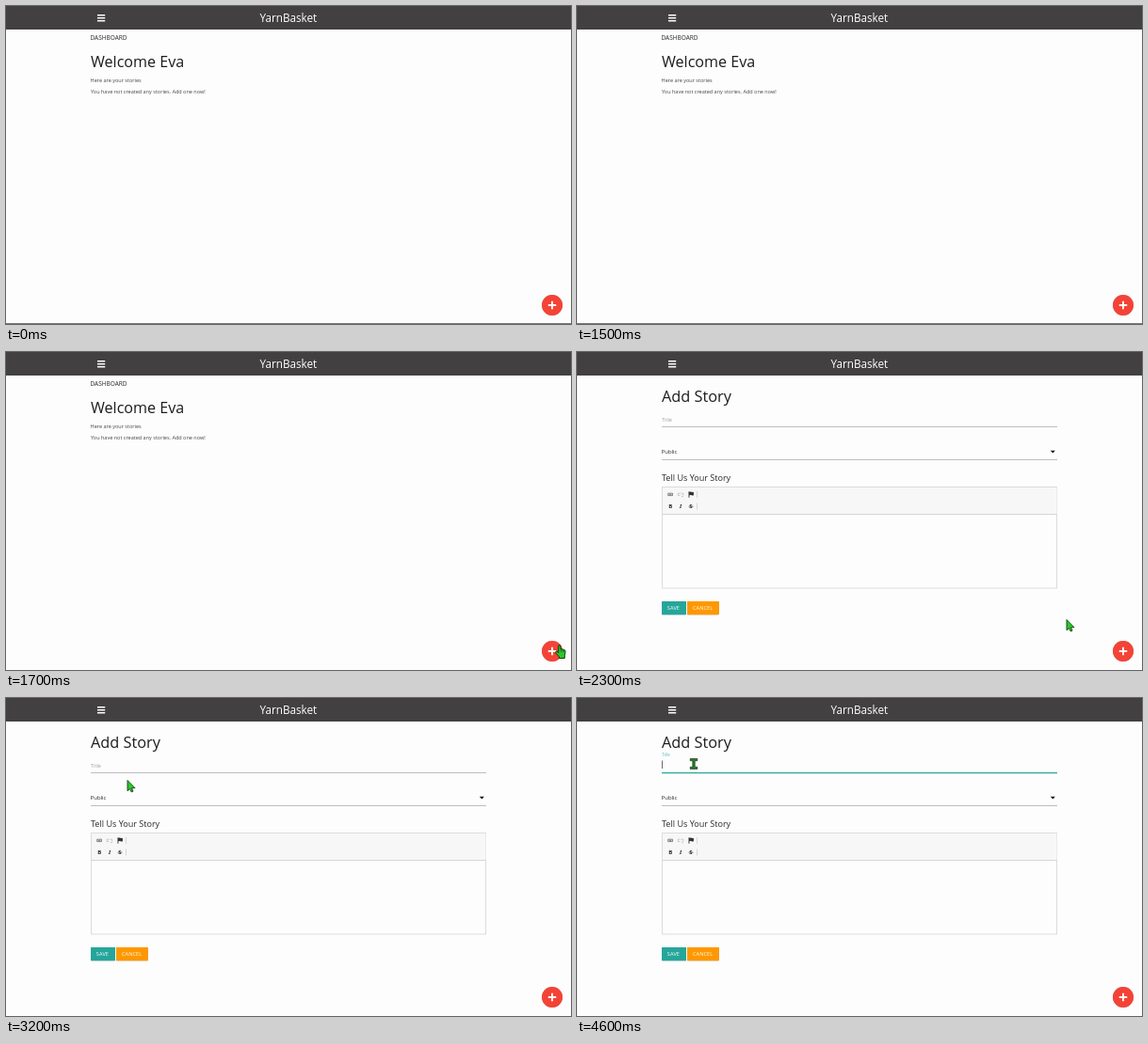
These frames come from a looping animation (600 px wide and 338 px high, 5 s). An HTML page:

```html
<!DOCTYPE html>
<html lang="en">
<head>
<meta charset="utf-8">
<title>Story dashboard</title>
<style>
  html, body { margin: 0; width: 100%; height: 100%; overflow: hidden; background: #fdfdfe; }
  svg { display: block; width: 100%; height: 100%; font-family: "Open Sans", "Noto Sans", sans-serif; fill: #2b2b2b; }
  .raised { filter: drop-shadow(0 .7px .6px #0006); }
  .heading { font-size: 16.1px; fill: #1c1c1c; }
  .body { font-size: 5.53px; fill: #444; }
  .button { font-size: 5.5px; letter-spacing: .16px; fill: #fff; }
  .tool { font: bold 6px "Open Sans", sans-serif; text-anchor: middle; }
</style>
</head>
<body>
<svg viewBox="0 0 600 338">
  <rect width="600" height="338" fill="#fdfdfe"/>

  <g class="raised">
    <rect width="600" height="25" fill="#424041"/>
  </g>
  <path d="M97 9.8h8.2M97 12.8h8.2M97 15.8h8.2" stroke="#fff" stroke-width="1.6"/>
  <text x="299.8" y="17.3" font-size="11.7" text-anchor="middle" fill="#fff">YarnBasket</text>

  <g id="dashboard">
    <text x="89.5" y="35.8" font-size="6.5">DASHBOARD</text>
    <text class="heading" x="90" y="65">Welcome Eva</text>
    <text class="body" x="89.6" y="80.8">Here are your stories</text>
    <text class="body" x="90" y="93.4">You have not created any stories. Add one now!</text>
  </g>
  <path id="edge" d="M0 337.5h600" stroke="#777"/>

  <g id="form">
    <text class="heading" x="90" y="53.2" style="font-size:16.3px">Add Story</text>
    <path d="M90 79.5h420M90 114.5h420" stroke="#bdbdbd"/>
    <path id="focusLine" d="M90 79.7h420" stroke="#26a69a" stroke-width="1.3"/>
    <text id="label" font-size="5.5">Title</text>
    <path id="caret" d="M90.5 66.5v8.5" stroke="#444" stroke-width=".8"/>
    <text x="89.6" y="108.2" font-size="6">Public</text>
    <path d="M502.8 104.8h5l-2.5 2.8z" fill="#111"/>
    <text x="90" y="137.4" font-size="9.05">Tell Us Your Story</text>

    <rect x="90.5" y="143.5" width="419" height="107.5" fill="none" stroke="#dcdcdc"/>
    <rect x="91" y="144" width="418.5" height="28.5" fill="#f7f7f7"/>
    <path d="M90 172.5h420M127.5 148v7M127.5 160.5v7" stroke="#d6d6d6"/>
    <g fill="none" stroke="#777" stroke-width=".9">
      <path d="M99 150.2h-2.3v2.4h2.3M99 150.2h2.5v2.4h-2.5M97.8 151.4h2.6"/>
      <path d="M109.5 150.2h-2.2v2.4h2.2M110.5 150.2h2.2v2.4M111 153.6h2" opacity=".4"/>
    </g>
    <path d="M118.5 148.2h.9v.5q1.2-.6 2.3 0t2.2 0v3.5q-1.1.6-2.2 0t-2.3 0v2.6h-.9z" fill="#333"/>
    <text class="tool" x="99.2" y="166.2">B</text>
    <text class="tool" x="110" y="166.2" style="font-family:'Noto Serif',serif;font-style:italic">I</text>
    <text class="tool" x="121" y="166.2">S</text>
    <path d="M118.5 164.2h5" stroke="#333" stroke-width=".6"/>

    <g class="raised">
      <rect x="90" y="265" width="26" height="14.2" rx=".6" fill="#26a69a"/>
      <rect x="117" y="265" width="33.8" height="14.2" rx=".6" fill="#ff9800"/>
    </g>
    <text class="button" x="95.8" y="274.4">SAVE</text>
    <text class="button" x="122.9" y="274.4">CANCEL</text>
  </g>

  <g class="raised">
    <circle cx="580" cy="318" r="11" fill="#f44336"/>
  </g>
  <path d="M575.8 318h8.4M580 313.8v8.4" stroke="#fff" stroke-width="1.9"/>

  <g id="hand">
    <path d="M-1.8-6.6q1.2-1 2.2.1V-3l4 1q1.3.5 1.2 2L4.8 4.2V7h-6V5.2L-4.9 1.3Q-5.2-.5-3.6-.2l1.8 1.4z"
      fill="#2bc72b" stroke="#123d12" stroke-width="1"/>
    <path d="M.6-2.6V.2M2.4-2V.4M4-1.5V.6" stroke="#123d12" stroke-width=".6"/>
  </g>
  <path id="arrow" d="M0-6V5.2l2.6-2.3L4.2 6.4 6 5.6 4.5 2.2H8z" fill="#2bc72b" stroke="#123d12" stroke-width=".9"/>
  <path id="beam" d="M-3.8-5.5h7.6v2.2H1.2v6.6h2.6v2.2h-7.6V3.3h2.6v-6.6h-2.6z" fill="#2c7a2c" stroke="#173f17" stroke-width=".7"/>

  <rect id="blackout" width="600" height="338" fill="#0f0f0f"/>
</svg>

<script>
const LOOP = 5000, STEP = 100;
const PAGE_CHANGE = 2200, FOCUS = 3500;

// Pointer positions: [ms, x, y]
const PATH = [
  [1700, 588.5, 318.5], [1900, 585, 319], [2200, 585, 319], [2400, 455, 262],
  [2500, 382, 238], [2700, 378, 232], [2900, 240, 160], [3100, 134, 117],
  [3300, 124, 70], [LOOP, 124, 70]
];

const part = id => document.getElementById(id);
const show = (id, on) => part(id).style.display = on ? "" : "none";
const clamp = v => Math.min(1, Math.max(0, v));
const easeOut = v => 1 - (1 - v) ** 1.8;

function pointerAt(t) {
  const i = Math.max(1, PATH.findIndex(p => p[0] > t));
  const [t0, x0, y0] = PATH[i - 1], [t1, x1, y1] = PATH[i];
  const k = clamp((t - t0) / (t1 - t0));
  return [x0 + (x1 - x0) * k, y0 + (y1 - y0) * k];
}

function drawPointer(t) {
  const [x, y] = pointerAt(t);
  const overText = (y > 173 && y < 251 && x < 510) || y < 82;
  const kind = t < 1700 ? "" : x > 569 ? "hand" : overText ? "beam" : "arrow";
  for (const id of ["hand", "arrow", "beam"]) {
    show(id, id === kind);
    part(id).setAttribute("transform", `translate(${x} ${y})`);
  }
}

function draw(now) {
  const t = Math.floor(now % LOOP / STEP) * STEP;
  show("dashboard", t < PAGE_CHANGE);
  show("form", t >= PAGE_CHANGE);
  show("edge", t < 1600);
  show("blackout", t === 1600);

  const focus = t - FOCUS;
  const lift = easeOut(clamp(focus / 200));
  part("label").setAttribute("transform", `translate(90 ${73.7 - 11.7 * lift}) scale(${1 - .2 * lift})`);
  part("label").style.fill = focus > 0 ? "#5cb9b0" : "#9e9e9e";
  part("focusLine").style.opacity = easeOut(clamp(focus / 300));
  show("caret", focus >= 0 && (focus <= 500 || focus >= 1100));

  drawPointer(t);
  requestAnimationFrame(draw);
}
draw(0);
</script>
</body>
</html>
```
